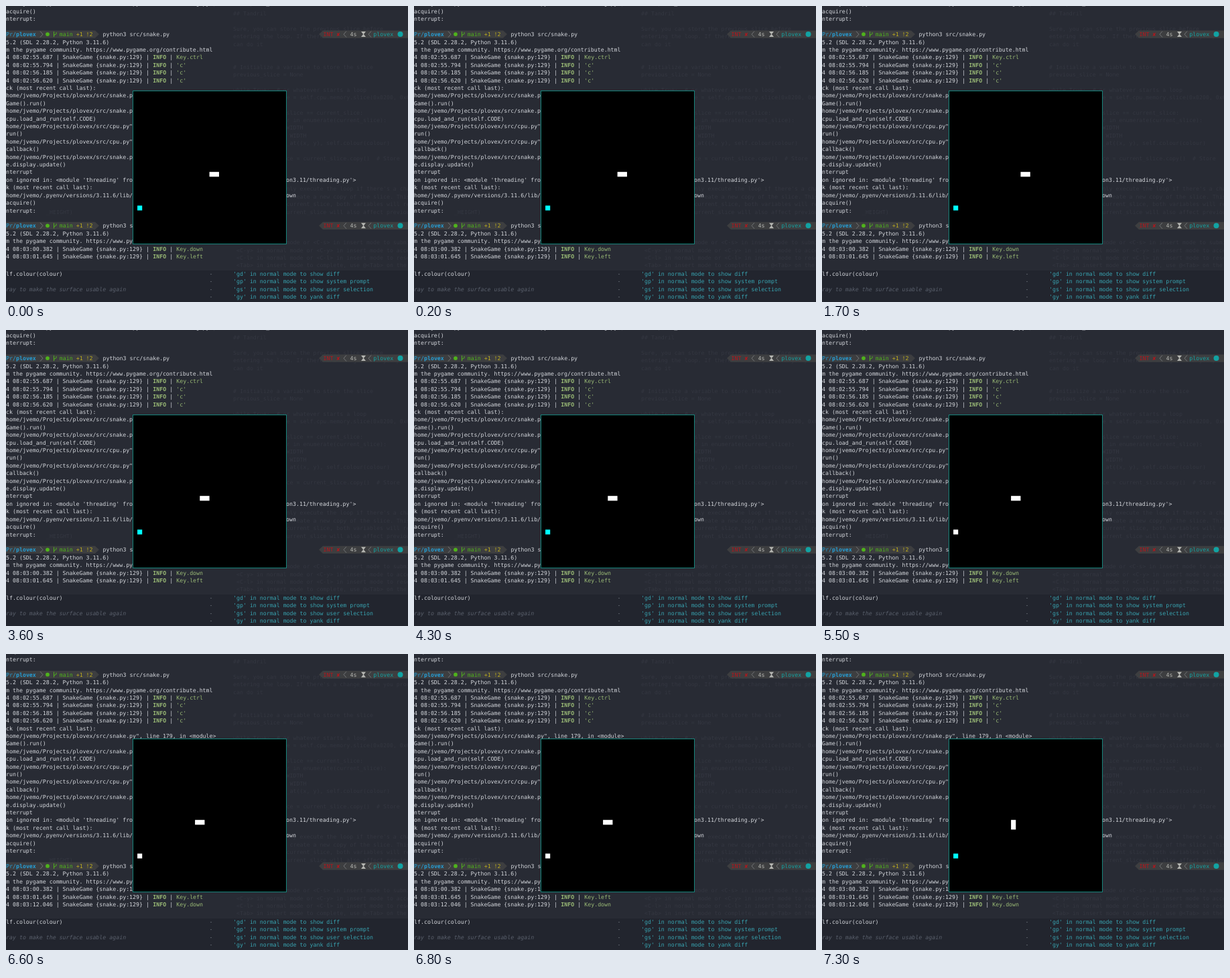
An HTML page with a canvas that plays this animation: 600x441 px, repeating every 8 s.

```html
<!DOCTYPE html>
<html lang="en">
<head>
<meta charset="utf-8">
<title>Snake in a terminal</title>
<style>
  html, body { margin: 0; width: 100%; height: 100%; overflow: hidden; background: #282b34; }
  canvas { display: block; }
</style>
</head>
<body>
<canvas id="stage" width="600" height="441"></canvas>
<script>
const ctx = document.getElementById('stage').getContext('2d');
const LOOP = 8000, COL = 4.985, ROW = 11.41, LAST_ROW = 373;
const COLORS = {
  terminal: '#282b34', editor: '#22252e', ghost: '#343741', text: '#d4d7dc',
  pill: '#3d3e40', green: '#9aba76', lime: '#4fb31c', yellow: '#bfae1e',
  blue: '#25a0d8', red: '#b5161c', teal: '#12a3a3', comment: '#5a606c', hint: '#38a3b0'
};

const home = 'home/jvemo/';
const project = home + 'Projects/plovex/src/';
const threading = home + '.pyenv/versions/3.11.6/lib/python3.11/threading.py';
const log = (time, key) => ({ time, key });
const PROMPT = { prompt: true };
const banner = [
  PROMPT,
  '5.2 (SDL 2.28.2, Python 3.11.6)',
  'm the pygame community. https://www.pygame.org/contribute.html'
];

const lines = [
  threading + '", line 1583, in _shutdown',
  'acquire()',
  'nterrupt:',
  '',
  ...banner,
  log('08:02:55.687', 'Key.ctrl'),
  log('08:02:55.794', "'c'"),
  log('08:02:56.185', "'c'"),
  log('08:02:56.620', "'c'"),
  'ck (most recent call last):',
  project + 'snake.py", line 179, in <module>',
  'Game().run()',
  project + 'snake.py", line 45, in run',
  'cpu.load_and_run(self.CODE)',
  project + 'cpu.py", line 96',
  'run()',
  project + 'cpu.py", line 120',
  'callback()',
  project + 'snake.py", line 110',
  'e.display.update()',
  'nterrupt',
  `on ignored in: <module 'threading' from '/${threading}'>`,
  'k (most recent call last):',
  threading + '", line 1583, in _shutdown',
  'acquire()',
  'nterrupt:',
  '',
  ...banner,
  log('08:03:00.382', 'Key.down'),
  log('08:03:01.645', 'Key.left'),
  log('08:03:12.046', 'Key.down')
];

// Editor text that shines faintly through the terminal: [y, text]
const ghostLines = [
  [11, '## Tandril'],
  [34, 'Sure, you can store the previous slice before'],
  [45, "entering the loop. If there's a change, then you proceed"],
  [57, 'can do it'],
  [91, '# Initialize a variable to store the slice'],
  [102, 'previous_slice = None'],
  [125, 'while True:  # or whatever starts a loop'],
  [136, '    current_slice = self.cpu.memory.slice(0x0200, 0x600)'],
  [159, '    if previous_slice == current_slice:'],
  [170, '    for i, colour in enumerate(current_slice):'],
  [181, '        x = i % WIDTH'],
  [193, '        y = i // WIDTH'],
  [204, '        surf.set_at((x, y), self.colour(colour)'],
  [227, '    previous_slice = current_slice.copy()  # Store'],
  [272, "This way it'll only execute the loop if there's a change"],
  [284, 'We use copy() to create a new copy of the slice. This is'],
  [295, 'because without current_slice, both variables will refer'],
  [307, 'and changes to current_slice will also affect previous_'],
  [352, " <CR> in normal mode or <C-s> in insert mode to submit"],
  [364, " <C-y> in normal mode or <C-y> in insert mode to accept"],
  [375, " <C-l> in normal mode or <C-l> in insert mode to reset"],
  [386, " <Tab> in insert mode to complete, use @<Tab> on the"]
];

function rect(x, y, w, h, color) {
  ctx.fillStyle = color;
  ctx.fillRect(x, y, w, h);
}

function shape(color, ...points) {
  ctx.fillStyle = color;
  ctx.beginPath();
  points.forEach(p => ctx.lineTo(...p));
  ctx.fill();
}

function stroke(color, width, ...points) {
  ctx.strokeStyle = color;
  ctx.lineWidth = width;
  ctx.beginPath();
  points.forEach(p => ctx.lineTo(...p));
  ctx.stroke();
}

function dot(x, y, r, color) {
  ctx.fillStyle = color;
  ctx.beginPath();
  ctx.arc(x, y, r, 0, 2 * Math.PI);
  ctx.fill();
}

function text(str, x, y, color = COLORS.text, style = '') {
  ctx.font = `${style} 8.28px "DejaVu Sans Mono", monospace`;
  ctx.fillStyle = color;
  ctx.fillText(str, x, y + 3);
}

function chevron(x, y, dir) {
  stroke('#777a7c', 0.9, [x - 2 * dir, y - 4.5], [x + 2 * dir, y], [x - 2 * dir, y + 4.5]);
}

function drawPrompt(y) {
  const top = y - 5.7, bottom = y + 5.7;
  shape(COLORS.pill, [0, top], [133, top], [139, y], [133, bottom], [0, bottom]);
  text('Pr/', 0, y, COLORS.blue);
  text('plovex', 3 * COL, y, COLORS.blue, 'bold');
  chevron(53, y, 1);
  dot(62, y, 2.9, COLORS.lime);
  stroke(COLORS.lime, 1, [71.5, y - 4], [71.5, y + 4]);
  stroke(COLORS.lime, 1, [71.5, y + 1.5], [75, y - 0.5], [75, y - 3]);
  text('main', 16 * COL, y, COLORS.lime);
  text('+1 !2', 21 * COL, y, COLORS.yellow);
  text('python3 src/snake.py', 29 * COL, y);

  shape(COLORS.pill, [600, top], [473, top], [467, y], [473, bottom], [600, bottom]);
  text('INT ✘', 95 * COL, y, COLORS.red);
  chevron(506, y, -1);
  text('4s', 103 * COL, y, '#b5b6b2');
  shape('#b5b6b2', [530, y - 4], [537, y - 4], [533.9, y], [537, y + 4], [530, y + 4], [533.1, y]);
  chevron(543, y, -1);
  text('plovex', 110 * COL, y, COLORS.teal);
  dot(588.5, y, 4, COLORS.teal);
}

function drawLine(line, y) {
  if (line.prompt) drawPrompt(y);
  else if (line.time) {
    text(`4 ${line.time} | SnakeGame {snake.py:129} |`, 0, y);
    text('INFO', 44 * COL, y, COLORS.green, 'bold');
    text('|', 49 * COL, y);
    text(line.key, 51 * COL, y, COLORS.green);
  } else text(line, 0, y);
}

function drawEditor() {
  rect(0, 394, 600, 47, COLORS.editor);
  text('lf.colour(colour)', 0, 399);
  text('ray to make the surface usable again', 0, 421.7, COLORS.comment, 'italic');
  ['gd', 'gp', 'gs', 'gy'].forEach((key, i) => {
    const y = 399 + i * ROW;
    const action = ['show diff', 'show system prompt', 'show user selection', 'yank diff'][i];
    text('-', 303.5, y, '#777b84');
    text(`'${key}' in normal mode to ${action}`, 339, y, COLORS.hint);
  });
}

function drawGame(t) {
  const cell = 7.17;
  const block = (x, y, w, h, color) =>
    rect(188.9 + x * cell, 125.3 + y * cell, w * cell, h * cell, color);
  rect(189, 126, 229, 229, '#000');
  ctx.strokeStyle = '#16837a';
  ctx.lineWidth = 1;
  ctx.strokeRect(189.5, 126.5, 229, 228);

  const head = 16 - [1700, 3600, 5400].filter(step => t >= step).length;
  const turned = t >= 7300;
  block(head, 17, turned ? 1 : 2, turned ? 2 : 1, '#fff');
  block(1, 24, 1, 1, t >= 5400 && !turned ? '#fff' : '#0ff');
}

function draw(t) {
  rect(0, 0, 600, 441, COLORS.terminal);
  ghostLines.forEach(([y, str]) => text(str, 339, y, COLORS.ghost));
  text('_HEIGHT)', 60, 307, COLORS.ghost);

  const shown = lines.length - (t < 6600 ? 1 : 0);
  for (let i = 0; i < shown; i++) drawLine(lines[i], LAST_ROW - (shown - 1 - i) * ROW);
  drawEditor();
  drawGame(t);
}

ctx.textRendering = 'geometricPrecision';
function tick() {
  draw(performance.now() % LOOP);
  requestAnimationFrame(tick);
}
tick();
</script>
</body>
</html>
```
